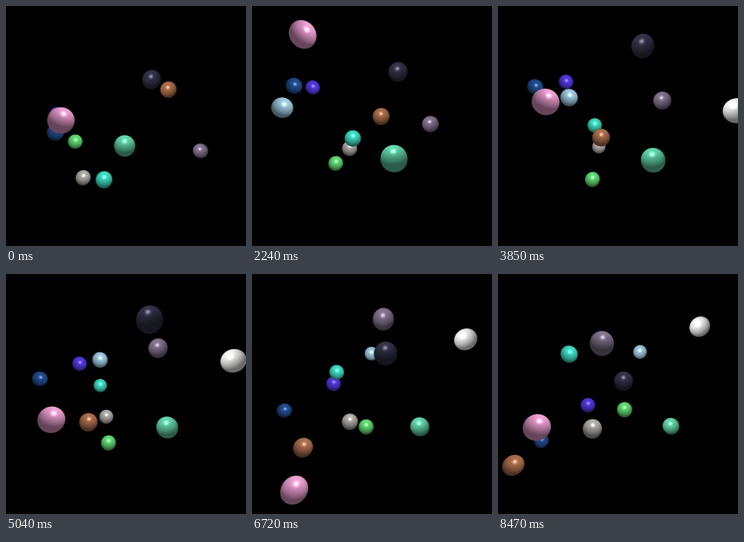
An HTML page with a canvas for the animation above (8.54 s loop, 300 px wide and 300 px high).

```html
<!DOCTYPE html>
<html lang="en">
<head>
<meta charset="utf-8">
<title>Bouncing spheres</title>
<style>
html, body { margin: 0; width: 100%; height: 100%; overflow: hidden; background: #000; }
canvas { display: block; width: 300px; height: 300px; }
</style>
</head>
<body>
<canvas id="stage" width="300" height="300"></canvas>
<script>
const ctx = document.getElementById('stage').getContext('2d');
const SIZE = 300, LOOP = 8540, STEP = 70, FOCAL = 260;
const image = ctx.createImageData(SIZE, SIZE);

// Camera at the origin, y down, z away; the unit of length is one sphere radius.
const LIGHT = [0, -10, 11];
const AMBIENT = 0.44, DIFFUSE = 0.6, SPECULAR = 110, SHININESS = 50;

// Limits for sphere centres
const WALLS = [[-12.6, 12.6], [-7.25, 7.7], [14.8, 31.7]];

// at: position at time t (s); v: velocity per second; before: velocity until t
const balls = [
  { rgb: [232, 156, 205], t: 0, at: [-4.94, -0.427, 15.85], v: [-0.144, -3.18, 0] },
  { rgb: [240, 240, 238], t: 2.09, at: [9.9, 1.19, 14.8], v: [-0.23, -1.37, 1.05], before: [0, 0, 0] },
  { rgb: [50, 49, 70], t: 1.2, at: [3.05, -4.36, 23.9], v: [-0.34, -1.21, -2.2], before: [0.27, 0.49, 1.42] },
  { rgb: [168, 108, 75], t: 0, at: [5.23, -4.49, 25.67], v: [-1.856, 1.505, -0.565] },
  { rgb: [128, 112, 138], t: 0, at: [10.2, 3.4, 28.5], v: [-1.36, -1.623, -1.34] },
  { rgb: [98, 210, 167], t: 0, at: [-0.12, 1.86, 19.5], v: [0.78, 0.245, -1.82] },
  { rgb: [96, 215, 114], t: 0, at: [-7.09, 2.18, 29.05], v: [0.939, 1.318, -0.203] },
  { rgb: [62, 218, 190], t: 2.24, at: [-2.35, 1.52, 25.45], v: [-0.55, -1, 2.14], before: [0.125, -2.19, 0.25] },
  { rgb: [174, 170, 166], t: 2.26, at: [-2.92, 2.91, 27.4], v: [0.04, 0.115, 2.3], before: [1.26, -1.79, -0.27] },
  { rgb: [80, 54, 218], t: 0, at: [-10.06, -1.73, 30.2], v: [0.698, -1.69, -0.18] },
  { rgb: [32, 74, 138], t: 0, at: [-8.44, 0.77, 24.93], v: [-0.65, -2.62, 0.67] },
  { rgb: [156, 198, 220], t: 7.11, at: [0.67, -6.34, 31.7], v: [1.88, 0.13, -0.88], before: [1.95, -0.93, 2.3] }
];

const dot = (a, b) => a[0] * b[0] + a[1] * b[1] + a[2] * b[2];
const sub = (a, b) => a.map((n, i) => n - b[i]);
const scale = (a, k) => a.map(n => n * k);
const unit = a => scale(a, 1 / Math.hypot(...a));
const clamp = (n, lo, hi) => Math.min(hi, Math.max(lo, n));

function bounce(p, [lo, hi]) {
  const w = hi - lo;
  const q = (((p - lo) % (2 * w)) + 2 * w) % (2 * w);
  return lo + (q > w ? 2 * w - q : q);
}

function place(ball, t) {
  const v = t < ball.t && ball.before || ball.v;
  return ball.at.map((p, i) => bounce(p + v[i] * (t - ball.t), WALLS[i]));
}

// Diffuse and specular strength where a ray meets the sphere
function lighting(ray, depth, centre) {
  const hit = scale(ray, depth);
  const normal = unit(sub(hit, centre));
  const light = unit(sub(LIGHT, hit));
  const half = unit(sub(light, ray));
  return {
    diffuse: AMBIENT + DIFFUSE * Math.max(0, dot(normal, light)),
    specular: SPECULAR * Math.max(0, dot(normal, half)) ** SHININESS
  };
}

function drawSphere(rgb, centre) {
  const r = FOCAL / centre[2];
  const cx = SIZE / 2 + centre[0] * r, cy = SIZE / 2 + centre[1] * r;
  const reach = r * 1.3 + 2;
  const from = c => clamp(Math.floor(c - reach), 0, SIZE);
  const to = c => clamp(Math.ceil(c + reach), 0, SIZE);

  for (let y = from(cy); y < to(cy); y++) {
    for (let x = from(cx); x < to(cx); x++) {
      const ray = unit([x + 0.5 - SIZE / 2, y + 0.5 - SIZE / 2, FOCAL]);
      const along = dot(ray, centre);
      const miss = Math.sqrt(Math.max(0, dot(centre, centre) - along * along));
      const cover = clamp((1 - miss) * r + 0.5, 0, 1);
      if (!cover) continue;
      const depth = along - Math.sqrt(Math.max(0, 1 - miss * miss));
      const { diffuse, specular } = lighting(ray, depth, centre);
      const i = (y * SIZE + x) * 4;
      rgb.forEach((c, k) => {
        const value = Math.min(255, c * diffuse + specular);
        image.data[i + k] += (value - image.data[i + k]) * cover;
      });
    }
  }
}

function draw(ms) {
  const t = Math.floor((ms % LOOP) / STEP) * STEP / 1000;
  new Uint32Array(image.data.buffer).fill(0xff000000);
  balls
    .map(ball => ({ rgb: ball.rgb, pos: place(ball, t) }))
    .sort((a, b) => b.pos[2] - a.pos[2])
    .forEach(({ rgb, pos }) => drawSphere(rgb, pos));
  ctx.putImageData(image, 0, 0);
}

const start = performance.now();
function tick() {
  draw(performance.now() - start);
  requestAnimationFrame(tick);
}
tick();
</script>
</body>
</html>
```
